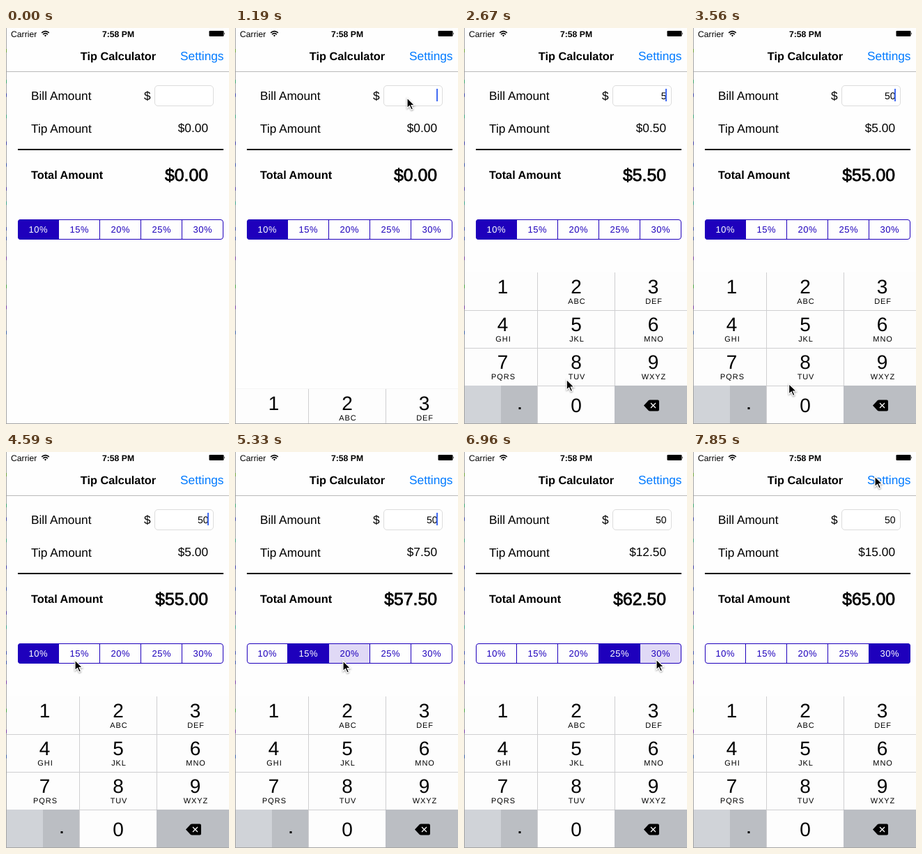
An HTML page that plays this animation: 320 px wide and 567 px high, repeating every 8 s.

```html
<!DOCTYPE html>
<html lang="en">
<head>
<meta charset="utf-8">
<title>Tip Calculator</title>
<style>
  html, body { margin: 0; width: 100%; height: 100%; overflow: hidden; background: #fefefe; }
  svg { display: block; width: 100%; height: 100%; }
  text { font: 17.3px "Liberation Sans", Arial, sans-serif; white-space: pre; text-rendering: geometricPrecision; }
  .strong { font-size: 16.3px; font-weight: bold; }
  .status { font-size: 12.2px; }
  .end { text-anchor: end; }
  .mid { text-anchor: middle; }
  #total { font-size: 24.8px; stroke: #000; stroke-width: .75px; }
  #bill { font-size: 14px; }
  #segments text { font-size: 13px; letter-spacing: .6px; }
  #keys .digit { font-size: 28px; }
  #keys .letters { font-size: 11px; letter-spacing: .9px; }
</style>
</head>
<body>
<svg viewBox="0 0 320 567" preserveAspectRatio="none">
  <rect width="320" height="567" fill="#fefefe"/>

  <text class="status" x="7" y="12.5">Carrier</text>
  <g fill="none" stroke="#000" stroke-width="1.7">
    <path d="M51.2 6.9Q56.5 2.3 61.8 6.9M53.1 9.2Q56.5 6.2 59.9 9.2"/>
    <path d="M54.8 10.6Q56.5 9.2 58.2 10.6L56.5 12.4Z" fill="#000" stroke="none"/>
  </g>
  <text class="strong status mid" x="161" y="12.5">7:58 PM</text>
  <rect x="291.5" y="4" width="21" height="8" rx="1.2"/>
  <path d="M313.3 6.3q1.8 1.7 0 3.5z"/>

  <text class="strong mid" x="161" y="46.3">Tip Calculator</text>
  <text class="end" x="312.5" y="46.3" fill="#007aff">Settings</text>
  <path d="M0 62.5H320" stroke="#b9b9b9"/>

  <text x="36" y="102.8">Bill Amount</text>
  <text x="198" y="102.8">$</text>
  <rect x="213.5" y="82.5" width="84" height="29" rx="4.5" fill="#fff" stroke="#dcdcdc"/>
  <text id="bill" class="end" x="290.5" y="102"></text>
  <rect id="caret" x="289" y="87" width="2" height="18" fill="#426bf2"/>
  <text x="36" y="149.6">Tip Amount</text>
  <text id="tip" class="end" x="290" y="148.8"></text>
  <path d="M17 174H312" stroke="#000" stroke-width="2"/>
  <text class="strong" x="36" y="215.8">Total Amount</text>
  <text id="total" class="end" x="290" y="219"></text>

  <clipPath id="round"><rect x="17" y="274" width="295" height="29" rx="4"/></clipPath>
  <g id="segments" clip-path="url(#round)"></g>
  <rect x="17.5" y="274.5" width="294" height="28" rx="3.5" fill="none" stroke="#1e00bc"/>

  <g id="keyboard">
    <rect y="350" width="320" height="217" fill="#cfcfd1"/>
    <g id="keys"></g>
    <path d="M258 540.5L264.5 533.5Q265.5 532.5 267 532.5H278Q280 532.5 280 534.5V546.5Q280 548.5 278 548.5H267Q265.5 548.5 264.5 547.5Z"/>
    <path d="M268 537l7 7m0-7l-7 7" stroke="#fff" stroke-width="1.3"/>
  </g>

  <!-- sliver of the desktop behind the window -->
  <path d="M.5 0V567M0 566.5H320" stroke="#a5a5a5"/>
  <g id="specks"></g>

  <path id="pointer" d="M0 0V14.8L3.5 11.6L6 17.1L8.5 16L6.1 10.7H10.8Z" stroke="#fff" stroke-width="1.2"
        style="filter:drop-shadow(0 1px 1px #0006)"/>
</svg>
<script>
const LOOP = 8000, STEPS = 54, STEP = LOOP / STEPS;
const INK = '#1e00bc', TINT = '#e0d9f6', GREY = '#bbbec3', WHITE = '#fdfdfd';
const RATES = [10, 15, 20, 25, 30];
const LETTERS = ['', 'ABC', 'DEF', 'GHI', 'JKL', 'MNO', 'PQRS', 'TUV', 'WXYZ'];
const KEYBOARD_HEIGHT = 217;

// Where the pointer rests, in steps; it presses one step after arriving.
const stops = [
  { arrive: 0, leave: 2, x: 316, y: 330 },
  { arrive: 6, x: 247, y: 100 },
  { arrive: 14, x: 145, y: 416, key: '5' },
  { arrive: 19, leave: 23, x: 148, y: 534, key: '0' },
  { arrive: 28, x: 48, y: 298, rate: 10 },
  { arrive: 31, x: 99, y: 298, rate: 15 },
  { arrive: 35, x: 155, y: 299, rate: 20 },
  { arrive: 41, x: 228, y: 295, rate: 25 },
  { arrive: 46, x: 276, y: 297, rate: 30 },
  { arrive: 53, x: 261, y: 35 }
];
const FOCUS = stops[1].arrive + 1;

const $ = id => document.getElementById(id);
const money = value => '$' + value.toFixed(2);
const mix = (a, b, k) => a + (b - a) * k;
function ease(k) {
  k = Math.min(1, Math.max(0, k));
  return k * k * (3 - 2 * k);
}

function add(parent, tag, attrs, text = '') {
  const node = document.createElementNS('http://www.w3.org/2000/svg', tag);
  for (const name in attrs) node.setAttribute(name, attrs[name]);
  node.textContent = text;
  return parent.appendChild(node);
}
const addBox = (parent, x, y, width, height, fill = WHITE) =>
  add(parent, 'rect', { x, y, width, height, fill });

const segments = RATES.map((rate, i) => {
  const x = 17 + 59 * i;
  const box = addBox($('segments'), x, 274, 59, 29);
  const label = add($('segments'), 'text', { x: x + 29.3, y: 293.4, class: 'mid' }, rate + '%');
  if (i) add($('segments'), 'path', { d: `M${x - .5} 274v29`, stroke: INK });
  return { rate, box, label };
});

const keys = {};
function addKey(digit, row, column) {
  const x = 111 * column - (column ? 5 : 0);
  const y = 350 + 54 * row + (row ? 1 : 0);
  const center = 55.5 + 108 * column - (column === 1 ? 2.5 : 0);
  keys[digit] = addBox($('keys'), x, y, column ? 110 : 105, 404 + 54 * row - y);
  add($('keys'), 'text', { x: center, y: 380 + 54 * row + (row > 2 ? 8 : 0), class: 'digit mid' }, digit);
  if (digit) add($('keys'), 'text', { x: center + 1, y: 395 + 54 * row, class: 'letters mid' }, LETTERS[digit - 1]);
}
LETTERS.forEach((_, n) => addKey(n + 1, Math.floor(n / 3), n % 3));
addKey(0, 3, 1);
addBox($('keys'), 0, 512, 53, 55, '#d0d3d8');
addBox($('keys'), 53, 512, 52, 55, GREY);
addBox($('keys'), 216, 512, 104, 55, GREY);
addBox($('keys'), 78.5, 543, 3, 3, '#000');

let seed = 7;
const random = () => (seed = seed * 16807 % 2147483647) / 2147483647;
for (let y = 30; y < 440; y += 12 + 35 * random())
  addBox($('specks'), 0, y, 1, 5, `hsl(${90 + 200 * random()} 45% 45%)`);

function pointerAt(step) {
  const i = stops.findLastIndex(stop => stop.arrive <= step);
  const from = stops[i], to = stops[i + 1] || from;
  const { leave = from.arrive + 2 } = from;
  const k = to === from ? 0 : ease((step - leave) / (to.arrive - leave));
  return [mix(from.x, to.x, k), mix(from.y, to.y, k)];
}

function draw(step) {
  const done = stops.filter(stop => stop.arrive + 2 <= step);
  const pressed = stops.find(stop => stop.arrive + 1 === step) || {};
  const typed = done.filter(stop => stop.key);
  const { rate = RATES[0] } = done.findLast(stop => stop.rate) || {};

  const bill = typed.map(stop => stop.key).join('');
  const tip = bill * rate / 100;
  $('bill').textContent = bill;
  $('tip').textContent = money(tip);
  $('total').textContent = money(+bill + tip);

  // The caret blinks once a second, starting over at each key.
  const awake = typed.length ? typed.at(-1).arrive + 2 : FOCUS + 1;
  const blink = (step - awake) * STEP / 1000 % 1;
  $('caret').style.display = step >= FOCUS && blink < .65 ? '' : 'none';

  for (const segment of segments) {
    const on = segment.rate === rate, down = segment.rate === pressed.rate;
    segment.box.setAttribute('fill', on ? (down ? '#6a58d0' : INK) : down ? TINT : '#fefefe');
    segment.label.setAttribute('fill', on ? '#fff' : INK);
  }
  for (const digit in keys)
    keys[digit].setAttribute('fill', digit === pressed.key ? GREY : WHITE);

  const drop = KEYBOARD_HEIGHT * (1 - ease((step - FOCUS) / 3.2));
  $('keyboard').setAttribute('transform', `translate(0 ${drop})`);
  $('pointer').setAttribute('transform', `translate(${pointerAt(step)})`);
  $('pointer').style.display = step < stops[0].leave ? 'none' : '';
}

const start = performance.now();
let shown = -1;
function tick() {
  const time = (performance.now() - start) % LOOP;
  // Steps begin slightly early so that rounded times land inside them.
  const step = Math.min(STEPS - 1, Math.floor((time + 15) / STEP));
  if (step !== shown) draw(shown = step);
  requestAnimationFrame(tick);
}
tick();
</script>
</body>
</html>
```
